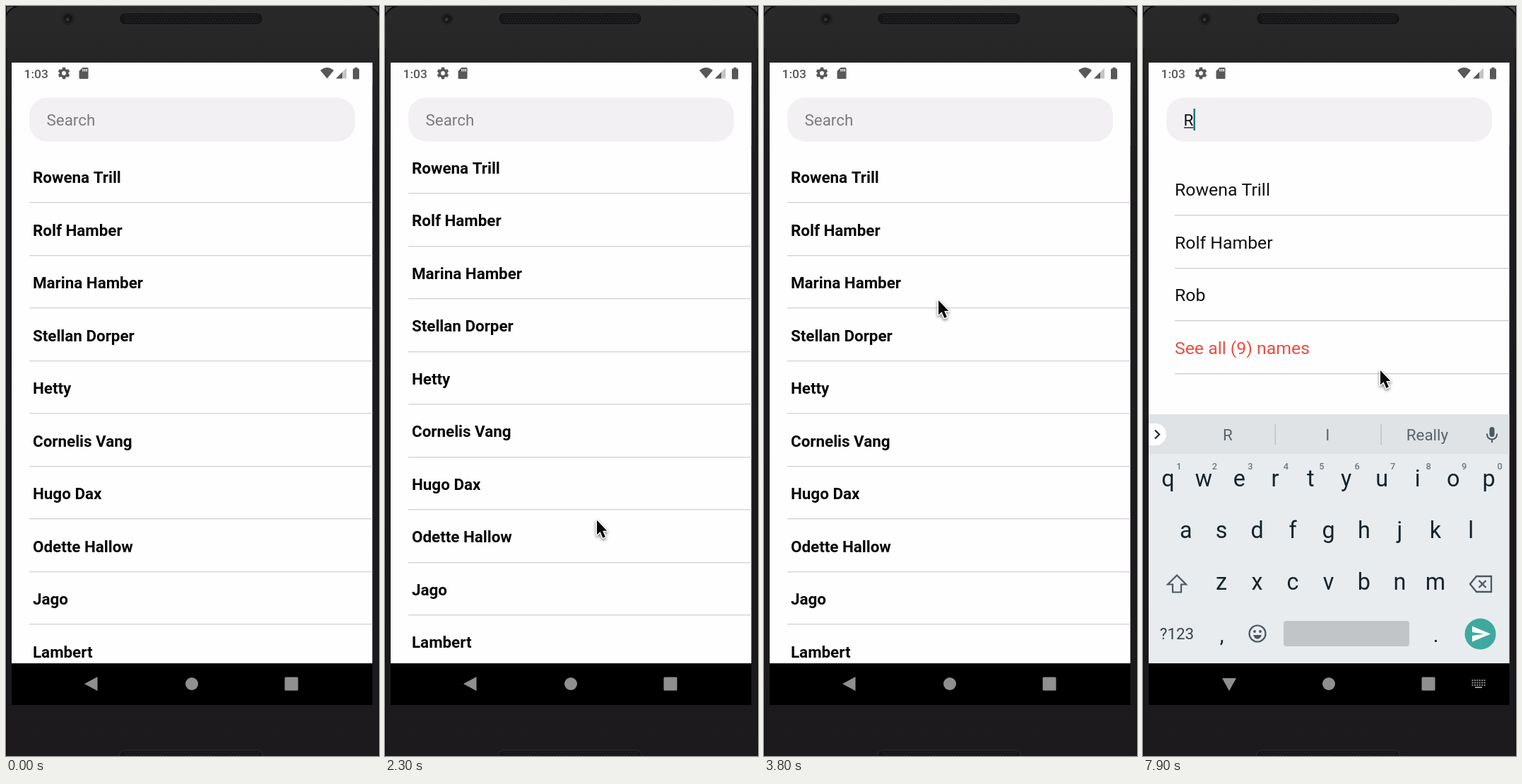
An HTML page with a canvas for the animation above (8 s loop, 528 by 1060 pixels).

```html
<!DOCTYPE html>
<html lang="en">
<head>
<meta charset="utf-8">
<title>Contact search</title>
<style>
  html, body { margin: 0; width: 100%; height: 100%; overflow: hidden; background: #1d1c1e; }
  canvas { display: block; width: 528px; height: 1060px; }
</style>
</head>
<body>
<canvas id="stage"></canvas>
<script>
const W = 528, H = 1060, LOOP = 8000, STEP = 100;
const canvas = document.getElementById('stage');
const dpr = window.devicePixelRatio || 1;
canvas.width = W * dpr;
canvas.height = H * dpr;
const c = canvas.getContext('2d');

const NAMES = ['Rowena Trill', 'Rolf Hamber', 'Marina Hamber', 'Stellan Dorper', 'Hetty',
  'Cornelis Vang', 'Hugo Dax', 'Odette Hallow', 'Jago', 'Lambert', 'Norvin', 'Una', 'Elsie', 'Rob'];
const ROW = 74.5, HEADER = 85;
const LEFT = 8, WIDE = 510.5, TOP = 112, BOTTOM = 929;
const PAPER = '#fffeff', INK = '#15232c', GREY = '#58585a', SOFT = '#4b575f', NAV = '#8f8f8f', TEAL = '#3fa9a0';

const FOCUS = 4600, CIRCLE = 5000, REST = 6400, TYPED = 6900;

const clamp = (v, a, b) => Math.max(a, Math.min(b, v));
const mix = (a, b, p) => a + (b - a) * p;
const phase = (t, from, to) => clamp((t - from) / (to - from), 0, 1);
const smooth = p => p * p * (3 - 2 * p);
const out = p => Math.sin(p * Math.PI / 2);

// Four strokes: up with a fling, down, further up, down.
function scrollAt(t) {
  return 229 * (out(phase(t, 1000, 1500)) - smooth(phase(t, 1600, 2420)))
    + 282 * (smooth(phase(t, 2500, 2975)) - smooth(phase(t, 3000, 3700)));
}

// The header hides with upward travel and returns with downward travel.
function headerShift(t) {
  let shift = 0;
  for (let s = STEP; s <= t; s += STEP) {
    shift = clamp(shift + scrollAt(s) - scrollAt(s - STEP), 0, HEADER);
  }
  return shift;
}

// Where the pointer holds the list, as [time, x, y] at zero scroll.
const GRIP = [[100, 292, 666], [350, 298, 784], [600, 303, 698], [1600, 303, 698], [2300, 300, 740],
  [2900, 297, 735], [3400, 275, 720], [3800, 247, 416], [4200, 198, 166], [4400, 195, 184], [4800, 203, 193]];
const LAST = GRIP[GRIP.length - 1];

function pointerAt(t) {
  if (t > CIRCLE) {
    // One sweep around the keyboard on the way to the resting place.
    const q = phase(t, CIRCLE, REST);
    return [mix(LAST[1], 336, q) + 240 * Math.sin(2 * Math.PI * q),
      mix(LAST[2], 515, q) + 520 * Math.sin(Math.PI * q) ** 2];
  }
  const b = GRIP.find(k => k[0] > t) || LAST;
  const a = GRIP[GRIP.indexOf(b) - 1];
  const p = phase(t, a[0], b[0]);
  return [mix(a[1], b[1], p), mix(a[2], b[2], p) - scrollAt(t)];
}

function rect(x, y, w, h, fill) {
  c.fillStyle = fill;
  c.fillRect(x, y, w, h);
}

function round(x, y, w, h, r, fill) {
  c.beginPath();
  c.roundRect(x, y, w, h, r);
  c.fillStyle = fill;
  c.fill();
}

function disc(x, y, r, fill) {
  c.beginPath();
  c.arc(x, y, r, 0, Math.PI * 2);
  c.fillStyle = fill;
  c.fill();
}

function ring(x, y, r, stroke, width) {
  c.beginPath();
  c.arc(x, y, r, 0, Math.PI * 2);
  c.strokeStyle = stroke;
  c.lineWidth = width;
  c.stroke();
}

function shape(d, x, y, fill, stroke, width = 2) {
  const p = new Path2D(d);
  c.save();
  c.translate(x, y);
  if (fill) { c.fillStyle = fill; c.fill(p); }
  if (stroke) { c.strokeStyle = stroke; c.lineWidth = width; c.stroke(p); }
  c.restore();
}

function text(s, x, y, size, fill, weight = 400, align = 'left') {
  c.font = `${weight} ${size}px Roboto, sans-serif`;
  c.textAlign = align;
  c.fillStyle = fill;
  c.fillText(s, x, y);
}

function clipped(y, h, draw) {
  c.save();
  c.beginPath();
  c.rect(LEFT, y, WIDE, h);
  c.clip();
  draw();
  c.restore();
}

function speaker(y) {
  round(160, y, 204, 18, 9, '#2e2d2f');
  round(161, y + 1, 202, 16, 8, '#161517');
  for (let r = 0; r < 4; r++) {
    for (let x = 168 + (r % 2) * 2; x < 358; x += 4) rect(x, y + 3 + r * 3.4, 1.6, 1.6, '#272628');
  }
}

function device() {
  const g = c.createLinearGradient(0, 0, 0, H);
  g.addColorStop(0, '#2a292a');
  g.addColorStop(0.08, '#262526');
  g.addColorStop(0.2, '#1e1c1e');
  g.addColorStop(1, '#1c1a1c');
  rect(0, 0, W, H, g);
  for (const x of [0, W - 1.5]) rect(x, 60, 1.5, H, '#131214');
  shape('M0 14Q4 4 16 0H0Z', 0, 0, '#4a494b', '#0e0d0f');
  shape('M0 14Q-4 4 -16 0H0Z', W, 0, '#4a494b', '#0e0d0f');
  disc(88, 18, 9, '#222122');
  disc(88, 18, 6, '#161517');
  disc(87, 19, 2.5, '#343335');
  speaker(9);
  speaker(1051);
}

function gear(x, y) {
  for (let i = 0; i < 6; i++) {
    c.save();
    c.translate(x, y);
    c.rotate(i * Math.PI / 3);
    rect(-2.2, -8.3, 4.4, 4, GREY);
    c.restore();
  }
  ring(x, y, 4.7, GREY, 3.6);
}

function statusBar() {
  rect(LEFT, 80, WIDE, TOP - 80, PAPER);
  text('1:03', 25.5, 102, 17.4, GREY, 500);
  gear(82, 95);
  shape('M5 0H11.500Q13 0 13 1.500V14.500Q13 16 11.500 16H1.500Q0 16 0 14.500V5Z', 103.5, 87, GREY);
  for (let i = 0; i < 3; i++) rect(108.3 + i * 2.6, 89, 1.4, 3.5, PAPER);
  shape('M0 4Q9.500 -4 19 4L9.500 15.500Z', 445, 87, GREY);
  shape('M0 15L15 0V15Z', 467, 87.5, '#c4c3c5');
  shape('M0 15L9 6V15Z', 467, 87.5, GREY);
  round(491, 88.5, 9, 15, 1.2, GREY);
  rect(493.5, 86.8, 4, 2.5, GREY);
}

function navBar(keyboard) {
  rect(LEFT, BOTTOM, WIDE, 988 - BOTTOM, '#000');
  if (keyboard) shape('M0 0H20L10 18Z', 112, 950, NAV);
  else shape('M18.500 0V20L0 10Z', 111, 948, NAV);
  disc(263, 958, 9, NAV);
  round(394.5, 948.5, 19, 19, 1.5, NAV);
  if (!keyboard) return;
  for (let i = 0; i < 18; i++) rect(465.5 + (i % 6) * 3.4, 952 + Math.floor(i / 6) * 3.4, 2, 2, NAV);
  rect(470, 962, 10, 2, NAV);
}

function list(scroll) {
  NAMES.forEach((name, i) => {
    const y = i * ROW - scroll;
    text(name, 38, Math.round(y + 250), 22.4, '#070607', 700);
    rect(33, Math.round(y + 277.3), WIDE, 1.4, '#d5d3d8');
  });
}

function results() {
  const rows = NAMES.filter(n => n[0] === 'R').concat('See all (9) names');
  rows.forEach((s, i) => {
    const y = i * ROW;
    text(s, 45, Math.round(y + 268), 24.8, i < 3 ? '#121113' : '#e94f40');
    rect(45, Math.round(y + 295.3), WIDE, 1.4, '#cfcdd2');
  });
}

function header(t, shift) {
  const typed = t >= TYPED;
  c.save();
  c.translate(0, -shift);
  rect(LEFT, TOP, WIDE, HEADER, PAPER);
  round(33, 129.5, 461, 62, 25, '#f2f0f3');
  if (typed) {
    text('R', 57.5, 169, 22.4, '#121113');
    rect(58, 171.3, 13.5, 1.3, '#121113');
  } else {
    text('Search', 57.5, 169, 22.4, '#7c7a7e');
  }
  // The blink restarts with the keystroke.
  const since = t - (typed ? TYPED : FOCUS + 100);
  if (since >= 0 && since % 1000 < 500) rect(typed ? 71.5 : 57.7, 145, 2.4, 31, '#14776c');
  c.restore();
}

function keys(lower) {
  ['QWERTYUIOP', 'ASDFGHJKL', 'ZXCVBNM'].forEach((row, r) => {
    [...row].forEach((k, i) => {
      const x = 35.5 + r * 25.2 + (r > 1 ? 25.2 : 0) + i * 50.45;
      const y = 683 + r * 73 - (lower ? 4 : 0);
      text(lower ? k.toLowerCase() : k, x, y, 32.3, INK, 400, 'center');
      if (r === 0) text((i + 1) % 10, x + 15.5, 655, 12.8, '#6d777e', 500, 'center');
    });
  });
}

function keyboard(t) {
  const lower = t >= TYPED + 100;
  const hints = t >= TYPED + 300 ? ['R', 'I', 'Really'] : ['Thanks', 'I', 'We'];

  rect(LEFT, 577, WIDE, 352, '#e8ecef');
  rect(LEFT, 577, WIDE, 56, '#dfe3e6');
  round(-10, 590, 43, 31, 15.5, '#fff');
  shape('M0 0L6 6L0 12', 17, 599.5, null, '#26343c', 2.4);
  hints.forEach((s, i) => {
    text(s, 120 + i * 141.2, 614, 22.4, '#59636a', 400, 'center');
    if (i) rect(36.5 + i * 150, 591, 1.3, 29, '#b7bdc1');
  });
  round(490.5, 595, 7, 14, 3.5, SOFT);
  shape('M0 0V1A7 7 0 0 0 14 1V0M7 8V12.500', 487, 604.5, null, SOFT);

  keys(lower);
  shape('M0 13L13 0L26 13H19V24H7V13Z', 35, 804.5, lower ? null : SOFT, SOFT, lower ? 2.2 : 0.5);
  shape('M9 0H30V22H9L0 11Z', 463, 806, null, SOFT, 2.3);
  shape('M0 0L10 10M10 0L0 10', 475.5, 812, null, SOFT, 2.3);

  text('?123', 48, 895, 22.4, '#35434b', 400, 'center');
  text(',', 111.5, 899, 29, INK, 400, 'center');
  text('.', 414.5, 899, 29, INK, 400, 'center');
  ring(162, 887, 11.5, SOFT, 2.2);
  for (const x of [158, 166]) disc(x, 884, 1.9, SOFT);
  shape('M0 0H12Q10 5.500 6 5.500T0 0Z', 156, 889, SOFT);

  round(199, 869, 178, 36, 4, '#c1c5c8');
  disc(477.5, 887.5, 22, TEAL);
  shape('M0 0L26 11L0 22V13.500L17 11L0 8.500Z', 466, 876.5, '#fff');
}

function pointer(x, y) {
  const d = 'M0 0V20.500L4.600 16.300L8.300 25L11.900 23.500L8.200 15H14.300Z';
  c.save();
  c.lineJoin = 'round';
  c.shadowColor = 'rgba(0,0,0,.4)';
  c.shadowBlur = 4 * dpr;
  c.shadowOffsetY = 2 * dpr;
  shape(d, x, y, '#fff', '#fff', 3);
  c.restore();
  shape(d, x, y, '#080808');
}

function draw(t) {
  const focused = t >= FOCUS;
  c.setTransform(dpr, 0, 0, dpr, 0, 0);
  device();
  rect(LEFT, 80, WIDE, BOTTOM - 80, PAPER);
  clipped(TOP, BOTTOM - TOP, () => {
    if (!focused) list(scrollAt(t));
    else if (t >= TYPED + 200) results();
    header(t, focused ? 0 : headerShift(t));
  });
  statusBar();
  navBar(focused);
  if (focused) {
    clipped(500, BOTTOM - 500, () => {
      c.translate(0, Math.round(352 * (1 - phase(t, FOCUS - 100, FOCUS + 400)) ** 3.6));
      keyboard(t);
    });
  }
  if (t >= 100) pointer(...pointerAt(t));
}

const start = performance.now();

function tick() {
  const t = (performance.now() - start) % LOOP;
  draw(Math.floor(t / STEP) * STEP);
  requestAnimationFrame(tick);
}
tick();
</script>
</body>
</html>
```
